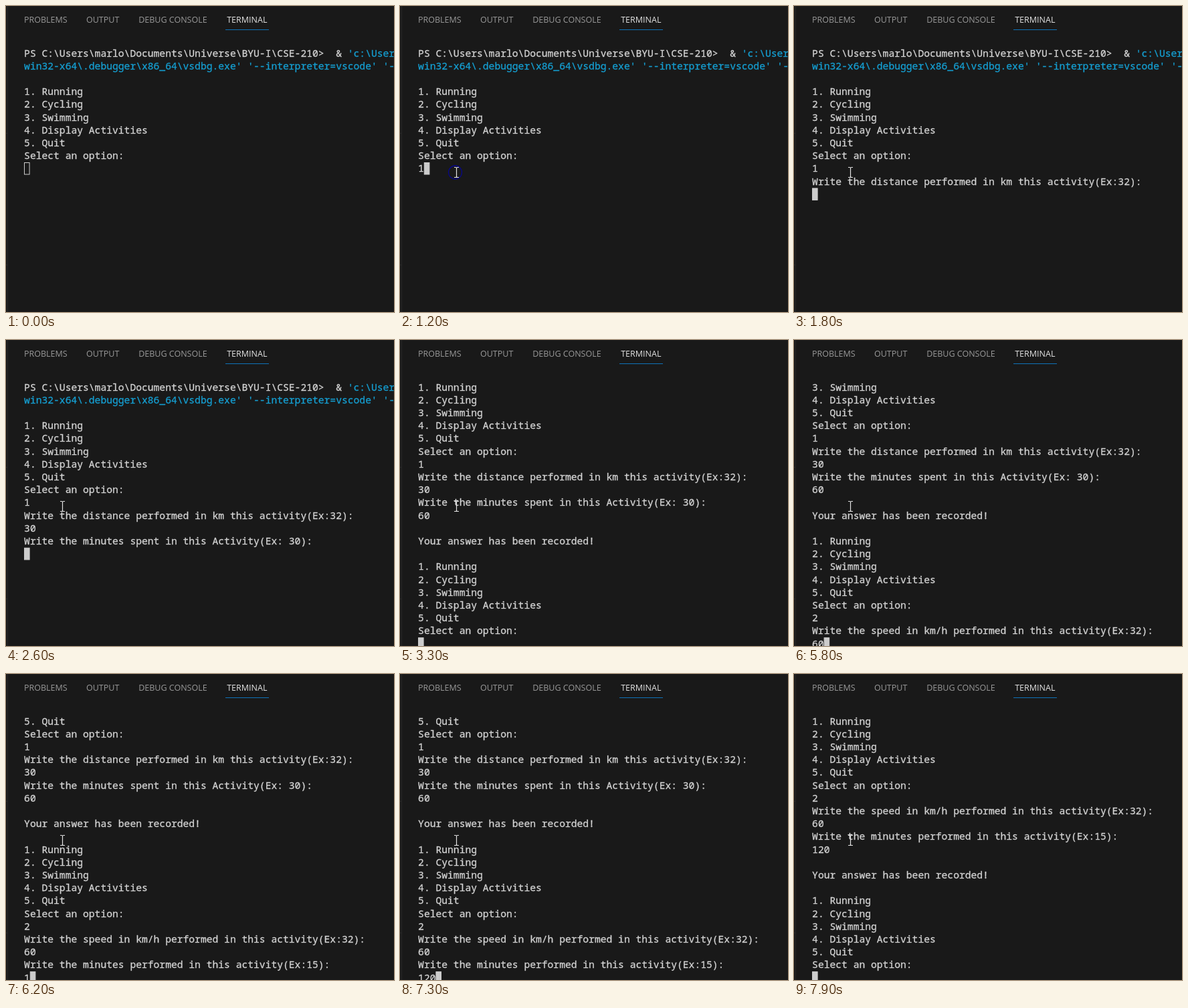
These frames come from a looping animation (580x458 px, 8000 ms). An HTML page:

```html
<!DOCTYPE html>
<html lang="en">
<head>
<meta charset="utf-8">
<title>Terminal session</title>
<style>
  html, body { margin: 0; width: 100%; height: 100%; overflow: hidden; background: #191919; }
  svg { display: block; width: 580px; height: 458px; }
  text { white-space: pre; }
  .tabs { font: 12.5px "Open Sans", "Noto Sans", sans-serif; fill: #999; }
  .tabs .active { fill: #e4e4e4; }
  #rows { font: 14.667px "Noto Sans Mono", monospace; font-variant-ligatures: none; stroke-width: 0.3; }
  #rows .plain { fill: #d4d4d4; stroke: #d4d4d4; }
  #rows .cyan { fill: #159fd2; stroke: #159fd2; }
  #caret { fill: #cccccc; stroke: #cccccc; }
  #caret.idle { fill: none; }
  #ring { fill: none; stroke: #0000b4; stroke-width: 1.3; }
  #pointer { fill: none; stroke: #e2e2e2; stroke-width: 1.2; }
</style>
</head>
<body>
<svg viewBox="0 0 580 458">
  <rect width="580" height="458" fill="#191919"/>
  <path d="M2.5 0V458M0 190.5H3M0 387.5H3" stroke="#272727"/>
  <g class="tabs">
    <text x="27" y="25">PROBLEMS</text>
    <text x="120" y="25">OUTPUT</text>
    <text x="198.2" y="25">DEBUG CONSOLE</text>
    <text x="330.2" y="25" class="active">TERMINAL</text>
  </g>
  <rect x="328" y="35" width="65" height="1" fill="#0f72b8"/>
  <g id="rows"></g>
  <rect id="caret"/>
  <circle id="ring" cx="82.5" cy="249"/>
  <path id="pointer" d="M-3.5 -7.5H-1.5Q0 -7.5 0 -6Q0 -7.5 1.5 -7.5H3.5M0 -6V6M-3.5 7.5H-1.5Q0 7.5 0 6Q0 7.5 1.5 7.5H3.5"/>
</svg>
<script>
const LOOP = 8000, STEP = 100;
const LEFT = 27.1, BASE = 75.6, CELL = 8.8, LINE = 19.2, ROWS = 21;
const FOCUS = 800, RING_END = 1800;

const menu = "1. Running\n2. Cycling\n3. Swimming\n4. Display Activities\n5. Quit\nSelect an option:\n";
const saved = "\n\nYour answer has been recorded!\n\n" + menu;
// Text after "|" is cyan.
const intro = "PS C:\\Users\\marlo\\Documents\\Universe\\BYU-I\\CSE-210>  & |'c:\\Users\n" +
  "|win32-x64\\.debugger\\x86_64\\vsdbg.exe' '--interpreter=vscode' '-\n\n";

const output = [
  [0, intro + menu],
  [1000, "1"],
  [1500, "\nWrite the distance performed in km this activity(Ex:32):\n"],
  [2000, "3"], [2100, "0"],
  [2500, "\nWrite the minutes spent in this Activity(Ex: 30):\n"],
  [2900, "6"], [3000, "0"],
  [3300, saved],
  [4300, "2"],
  [4700, "\nWrite the speed in km/h performed in this activity(Ex:32):\n"],
  [5400, "6"], [5500, "0"],
  [6000, "\nWrite the minutes performed in this activity(Ex:15):\n"],
  [6200, "1"], [6300, "2"], [6500, "0"],
  [7700, saved]
];

const $ = id => document.getElementById(id);
const svg = (tag, attrs, parent) => {
  const el = document.createElementNS("http://www.w3.org/2000/svg", tag);
  set(el, attrs);
  return parent.appendChild(el);
};
function set(el, attrs) {
  for (const k in attrs) el.setAttribute(k, attrs[k]);
}

const rows = Array.from({ length: ROWS }, (_, i) => {
  const text = svg("text", { x: LEFT, y: BASE + i * LINE }, $("rows"));
  return ["plain", "cyan"].map(name => svg("tspan", { class: name }, text));
});

function drawTerminal(t) {
  const lines = output.filter(([at]) => at <= t).map(([, s]) => s).join("").split("\n");
  const shown = lines.slice(-ROWS);
  rows.forEach((spans, i) => {
    const parts = (shown[i] || "").split("|");
    spans.forEach((span, k) => { span.textContent = parts[k] || ""; });
  });
  const last = shown.length - 1;
  set($("caret"), {
    x: LEFT + shown[last].length * CELL + 0.4,
    y: BASE - 13.9 + last * LINE,
    width: CELL - 1.2,
    height: LINE - 1.7,
    class: t < FOCUS ? "idle" : ""
  });
}

function drawPointer(t) {
  const u = Math.min(1, Math.max(0, (t - 100) / 300));
  const away = (1 - u) ** 2;
  set($("pointer"), {
    transform: `translate(${84.5 + 391 * away} ${249 - 14 * away})`,
    opacity: t < 100 ? 0 : 1
  });
  const ringOn = t >= FOCUS && t < RING_END;
  set($("ring"), {
    r: ringOn ? 4 + (t - FOCUS) * 0.015 : 0,
    opacity: ringOn ? 1 - 0.7 * (t - FOCUS) / (RING_END - FOCUS) : 0
  });
}

let drawn = -1;
function tick(now) {
  const t = Math.floor((now % LOOP) / STEP) * STEP;
  if (t !== drawn) {
    drawTerminal(t);
    drawPointer(t);
    drawn = t;
  }
  requestAnimationFrame(tick);
}
tick(0);
</script>
</body>
</html>
```
